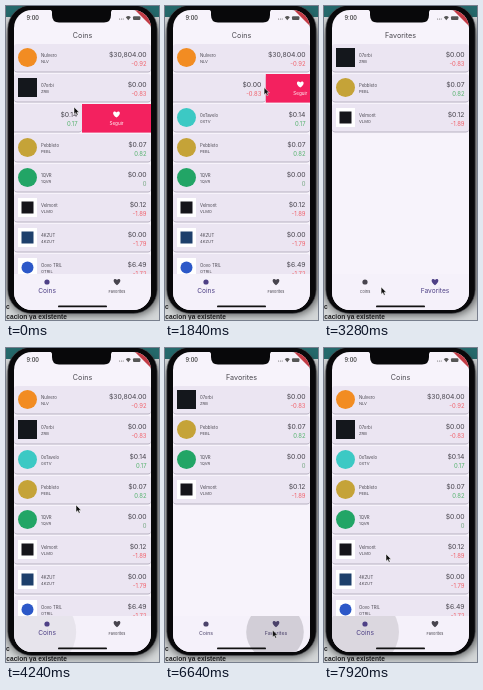
Recreate the animation shown at these times as an HTML page. Size 153x314 px, loop 8 s.

```html
<!DOCTYPE html>
<html lang="es">
<head>
<meta charset="utf-8">
<title>Coins</title>
<style>
  html, body { margin: 0; width: 100%; height: 100%; overflow: hidden; background: #d3d6d7; }
  svg { display: block; width: 100vw; height: 100vh; font-family: Inter, Roboto, sans-serif; }
</style>
</head>
<body>
<svg id="stage" viewBox="0 0 153 314">
  <defs>
    <clipPath id="screen"><rect x="8" y="4" width="137" height="300" rx="18"/></clipPath>
    <clipPath id="list"><rect x="8" y="37" width="137" height="231"/></clipPath>
    <clipPath id="bar"><rect x="8" y="268" width="137" height="36"/></clipPath>
    <filter id="blur" x="-20%" y="-10%" width="140%" height="120%"><feGaussianBlur stdDeviation="4"/></filter>
    <path id="heart" d="M0 3.1C-5 -.6-3.4-3.4-1.6-3.1-.7-3-.2-2.4 0-2 .2-2.4.7-3 1.6-3.1 3.4-3.4 5-.6 0 3.1Z"/>
  </defs>
  <rect width="153" height="314" fill="#d3d6d7"/>
  <rect width="153" height="11" fill="#25696b"/>
  <rect x="1" y="6" width="153" height="303" rx="26" fill="#000" opacity=".6" filter="url(#blur)"/>
  <g font-family="Liberation Sans, Arial, sans-serif" font-weight="700" font-size="6.6" fill="#1c1c1e">
    <text x="0" y="303">c</text>
    <text x="-1.5" y="313">icacion ya existente</text>
  </g>
  <rect x="1.8" y="-1" width="149.4" height="308.5" rx="24" fill="#08080a" stroke="#55565c" stroke-width=".6"/>
  <g clip-path="url(#screen)">
    <rect x="8" y="4" width="137" height="300" fill="#f7f3fb"/>
    <text id="title" x="76.5" y="32" font-size="7.2" text-anchor="middle" fill="#48464d">Coins</text>
    <g id="rows" clip-path="url(#list)"></g>
    <rect x="8" y="268" width="137" height="36" fill="#f5f1fa"/>
    <g clip-path="url(#bar)"><circle id="ripple" fill="#77757a"/></g>
    <circle id="coinIcon" cx="41" cy="276" r="2.6"/>
    <use id="heartIcon" href="#heart" x="111" y="276.2"/>
    <text id="coinTab" x="41" y="287.4" text-anchor="middle">Coins</text>
    <text id="favTab" x="111" y="287.4" text-anchor="middle">Favorites</text>
    <rect x="52" y="299.6" width="49" height="1.7" rx=".85" fill="#111"/>
    <text x="20.5" y="14.2" font-size="5.6" font-weight="500" fill="#333">9:00</text>
    <g fill="#555">
      <circle cx="113.6" cy="13" r=".5"/><circle cx="115.4" cy="13" r=".5"/><circle cx="117.2" cy="13" r=".5"/>
      <path d="M119.8 11.2Q122.3 9 124.8 11.2L122.3 14.2Z"/>
      <rect x="127" y="10.2" width="7.4" height="3.8" rx="1"/>
    </g>
    <path d="M129 4H136.5L145 12.5V20Z" fill="#c23b45"/>
  </g>
  <path d="M42 3H108Q105 4 105 6V9Q105 16.5 98 16.5H53Q46 16.5 46 9V6Q46 4 42 3Z" fill="#08080a"/>
  <path id="cursor" d="M0 0V7.2L1.7 5.7 2.9 8.3 4.1 7.7 3 5.2H5.2Z" fill="#111" stroke="#fff" stroke-width=".5"/>
</svg>
<script>
const LOOP = 8000, TOP = 38, PITCH = 30, PANE = 69;
const DRAG = 360, TAP = 760, CLOSE = 200, SWITCH = 100;
const $ = id => document.getElementById(id);
const clamp = v => Math.max(0, Math.min(1, v));
const smooth = v => v * v * (3 - 2 * v);

// name, ticker, price, change, shape, colour, shape inside, its colour
const coins = [
  ['Nulvero', 'NLV', '$30,804.00', '-0.92', 'circle', '#f28c22'],
  ['07orbi', 'ZRB', '$0.00', '-0.83', 'square', '#14171c'],
  ['0xTavelo', '0XTV', '$0.14', '0.17', 'circle', '#3cc9c4'],
  ['Pebbleto', 'PEBL', '$0.07', '0.82', 'circle', '#c5a338'],
  ['1QVR', '1QVR', '$0.00', '0', 'circle', '#22a566'],
  ['Velmorit', 'VLMO', '$0.12', '-1.89', 'square', '#ffffff', 'square', '#15151a'],
  ['4KZUT', '4KZUT', '$0.00', '-1.79', 'square', '#ffffff', 'square', '#1d3f6b'],
  ['Oovo TRIL', 'OTRIL', '$6.49', '-1.72', 'square', '#ffffff', 'circle', '#2c58c8']
];

// A swipe opens a row, then a tap on its heart toggles the favorite
const swipes = [
  { row: 2, start: -380, x: 137, y: 101 },
  { row: 1, start: 1000, x: 120, y: 81 },
  { row: 4, start: 4880, x: 131, y: 168 }
];
const taps = [
  { start: 2500, x: 108, y: 281, fav: true },
  { start: 3780, x: 33, y: 284 },
  { start: 6440, x: 110, y: 284, fav: true },
  { start: 7580, x: 40, y: 284 }
];
const followed = [2, 3, 5];

const swipeKeys = ({ start, x, y }) => [
  [start - 100, x, y], [start, x, y],
  [start + DRAG, x - PANE, y], [start + DRAG + 80, x - PANE, y],
  [start + TAP - 120, 99, y - 2], [start + TAP + 40, 99, y - 2]
];
const tapKeys = ({ start, x, y }) => [[start - 80, x - 1, y - 2], [start + 120, x - 1, y - 2]];
const pointer = [
  ...swipes.flatMap(swipeKeys), ...taps.flatMap(tapKeys), [4240, 70, 157], [7920, 62, 206]
].sort((a, b) => a[0] - b[0]);

function pointerAt(t) {
  const i = pointer.findIndex(k => k[0] > t);
  if (i < 0) return pointer[pointer.length - 1].slice(1);
  const [a, b] = [pointer[i - 1], pointer[i]];
  const p = smooth((t - a[0]) / (b[0] - a[0]));
  return [1, 2].map(k => a[k] + (b[k] - a[k]) * p);
}

function slideAt(row, t) {
  const swipe = swipes.find(s => s.row === row);
  if (!swipe) return 0;
  const age = t - swipe.start;
  return PANE * (smooth(clamp(age / DRAG)) - smooth(clamp((age - TAP) / CLOSE)));
}

function isFollowed(row, t) {
  const toggled = swipes.some(s => s.row === row && t >= s.start + TAP);
  return followed.includes(row) !== toggled;
}

function add(parent, tag, attrs, text = '') {
  const el = document.createElementNS('http://www.w3.org/2000/svg', tag);
  for (const k in attrs) el.setAttribute(k, attrs[k]);
  el.textContent = text;
  return parent.appendChild(el);
}

function addMark(g, shape, size, fill) {
  const r = size / 2;
  if (shape === 'circle') add(g, 'circle', { cx: 21.5, cy: 13.5, r, fill });
  else add(g, 'rect', { x: 21.5 - r, y: 13.5 - r, width: size, height: size, fill });
}

function buildRow([name, ticker, price, change, shape, fill, inner, innerFill]) {
  const row = add($('rows'), 'g', {});
  const slider = add(row, 'g', {});
  const label = (text, x, y, size, color, anchor = 'start') =>
    add(slider, 'text', { x, y, 'font-size': size, fill: color, 'text-anchor': anchor }, text);
  add(slider, 'rect', { x: 8.2, y: 1.4, width: 136.6, height: 27.2, rx: 3, fill: '#b7b1c1' });
  add(slider, 'rect', { x: 8, y: 0, width: 137, height: 27.4, rx: 3, fill: '#ebe5f2' });
  addMark(slider, shape, 19, fill);
  if (inner) addMark(slider, inner, 12, innerFill);
  label(name, 35, 12.7, 4.3, '#4a4750');
  label(ticker, 35, 18.8, 4.1, '#4a4750');
  label(price, 140.5, 12.6, 6.8, '#4a4750', 'end');
  const tone = change[0] === '-' ? '#f0606a' : change === '0' ? '#77a884' : '#55b26e';
  label(change, 140.5, 21.8, 5.9, tone, 'end');
  add(slider, 'rect', { x: 145, y: 0, width: PANE, height: 28.6, fill: '#f3215f' });
  add(slider, 'use', { href: '#heart', x: 179.5, y: 10.5, fill: '#fff' });
  label('Seguir', 179.5, 21, 4.6, '#fff', 'middle');
  return { row, slider };
}
const rows = coins.map(buildRow);

const mix = (a, b, p) => `rgb(${a.map((v, i) => Math.round(v + (b[i] - v) * p))})`;
function paintTab(icon, label, p) {
  const fill = mix([72, 69, 78], [78, 64, 134], p);
  icon.setAttribute('fill', fill);
  label.setAttribute('fill', fill);
  label.setAttribute('font-size', 3.9 + 2.7 * p);
}

function drawTabs(t, fav, age) {
  const shift = clamp((age - SWITCH) / 200);
  const p = fav ? shift : 1 - shift;
  $('title').textContent = fav ? 'Favorites' : 'Coins';
  paintTab($('coinIcon'), $('coinTab'), 1 - p);
  paintTab($('heartIcon'), $('favTab'), p);
}

function drawRows(t, fav) {
  let slot = 0;
  rows.forEach(({ row, slider }, i) => {
    const visible = !fav || isFollowed(i, t);
    row.setAttribute('display', visible ? 'inline' : 'none');
    if (!visible) return;
    row.setAttribute('transform', `translate(0 ${TOP + PITCH * slot++})`);
    slider.setAttribute('transform', `translate(${-slideAt(i, t)} 0)`);
  });
}

function drawRipple(t) {
  const tap = taps.filter(s => s.start <= t).pop() || { ...taps[0], start: -LOOP };
  const age = t - tap.start;
  const ripple = $('ripple');
  ripple.setAttribute('cx', tap.x);
  ripple.setAttribute('cy', tap.y);
  ripple.setAttribute('r', 39 * (1 - Math.exp(-age / 150)));
  ripple.setAttribute('opacity', .28 * clamp(age / 150) * (1 - clamp((age - 250) / 350)));
}

function draw(t) {
  const last = taps.filter(s => s.start + SWITCH <= t).pop() || { start: -LOOP };
  drawTabs(t, last.fav, t - last.start);
  drawRows(t, last.fav);
  drawRipple(t);
  $('cursor').setAttribute('transform', `translate(${pointerAt(t).join(' ')})`);
}

const start = performance.now();
function tick(now) {
  draw(Math.max(0, now - start) % LOOP);
  requestAnimationFrame(tick);
}
draw(0);
requestAnimationFrame(tick);
</script>
</body>
</html>
```
